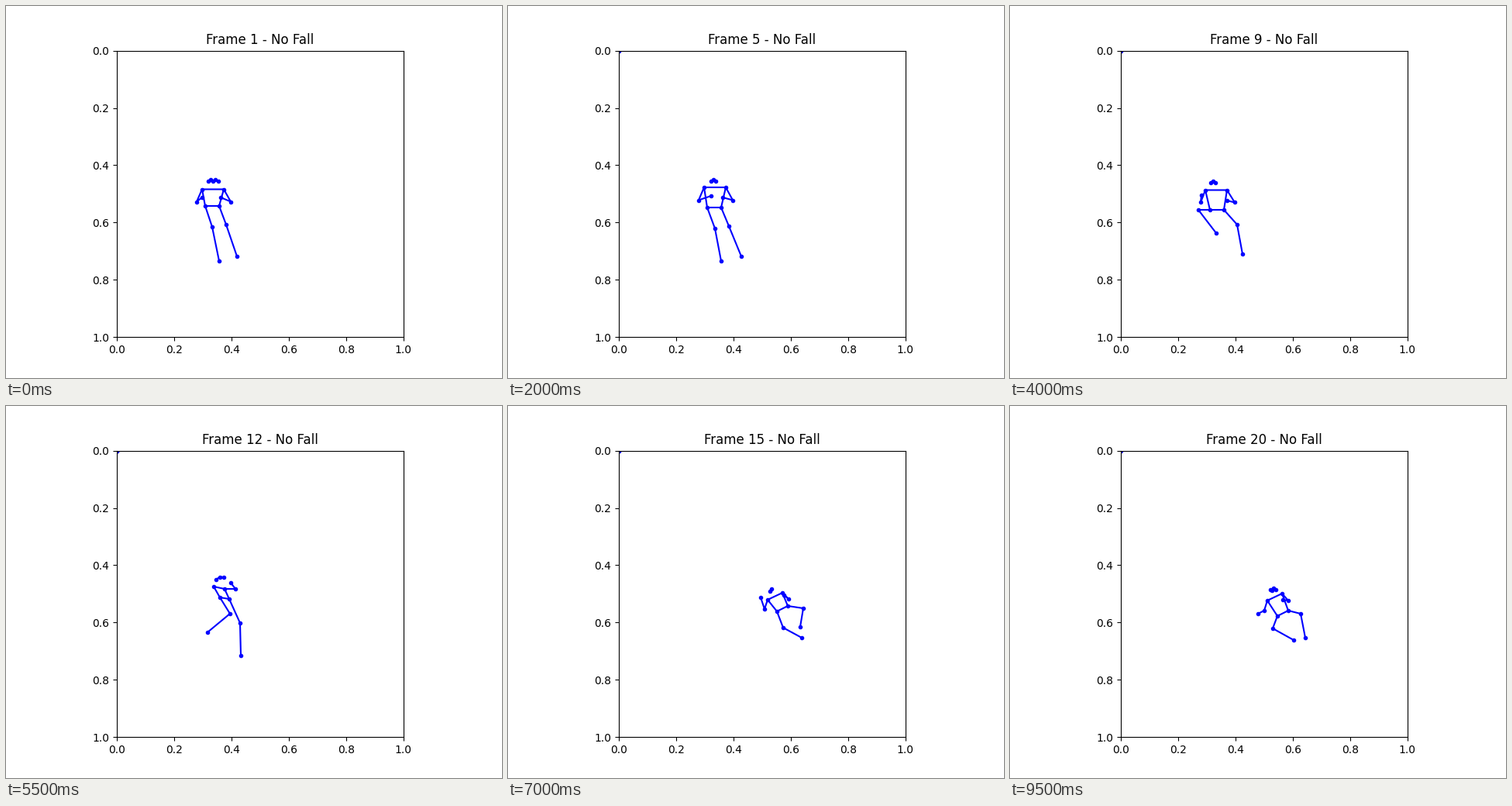
Animation of 640x480 px, one loop 10 s. Source, as a matplotlib script:

```python
import numpy as np
import matplotlib.pyplot as plt
from matplotlib.animation import FuncAnimation

FRAMES, INTERVAL = 20, 500
AXES_ORIGIN, AXES_SIZE = np.array([143.2, 57.6]), 369.6

# Three chains of joints, each running from the right side to the left.
FACE = ["r_ear", "r_eye", "nose", "l_eye", "l_ear"]
ARMS = ["r_wrist", "r_elbow", "r_shoulder", "l_shoulder", "l_elbow", "l_wrist"]
LEGS = ["r_ankle", "r_knee", "r_hip", "l_hip", "l_knee", "l_ankle"]
JOINTS = FACE + ARMS + LEGS
EDGES = [edge for chain in (FACE, ARMS, LEGS) for edge in zip(chain, chain[1:])]
EDGES += [("r_shoulder", "r_hip"), ("l_shoulder", "l_hip")]


def face(nose, step):
    """Five points spaced evenly along a line, with the eyes raised."""
    return {name: np.add(nose, np.multiply(step, k)) - (0, 2 * (abs(k) == 1))
            for k, name in enumerate(FACE, start=-2)}


def pose(nose, step, arms, legs):
    limbs = dict(zip(ARMS + LEGS, np.array(arms + legs, float)))
    return face(nose, step) | limbs


def standing():
    """Both sides mirror each other; the legs trail off to the lower right."""
    joints = face((267, 226), (3.25, 0))
    for side, s in (("r", -1), ("l", 1)):
        hip = np.array([266 + 9 * s, 258])
        joints |= {
            f"{side}_shoulder": np.array([267 + 14 * s, 236.5]),
            f"{side}_elbow": np.array([268 + 22 * s, 252.5]),
            f"{side}_wrist": np.array([265 + 12 * s, 247]),
            f"{side}_hip": hip,
            f"{side}_knee": hip + (9, 25.5 - 1.5 * s),
            f"{side}_ankle": hip + (20.5 + 2.5 * s, 68 - 3 * s),
        }
    return joints


STAND = standing()
BEND = pose(
    (281, 221), (5, -1.5),
    [(258, 240), (266, 246), (268, 233), (282, 236), (296, 236), (290, 228)],
    [(260, 292), (289, 268), (276, 247), (288, 249), (302, 280), (303, 322)])
SIT = pose(
    (335, 238), (2.4, -0.7),
    [(320, 261), (326, 262), (329, 250), (348, 241), (357, 249), (342, 250)],
    [(366, 302), (339, 287), (345, 269), (359, 262), (375, 268), (380, 286)])


def progress(frame, start, end):
    return np.clip((frame - start) / (end - start), 0, 1)


def move(joints, amount, **shifts):
    """Shift joints; a name without a side moves the whole group."""
    moved = dict(joints)
    for part, shift in shifts.items():
        group = FACE if part == "face" else [n for n in JOINTS if part in n]
        for name in group:
            moved[name] = moved[name] + amount * np.array(shift)
    return moved


def blend(a, b, u):
    return {name: (1 - u) * a[name] + u * b[name] for name in JOINTS}


def walk(frame):
    joints = move(STAND, progress(frame, 1, 5),
                  face=(1, 0), shoulder=(0, -2.5), hip=(0, 2), elbow=(0, -2),
                  r_wrist=(9, -2), knee=(1, 2), l_ankle=(3, 0))
    # The right foot stays planted, then lifts quickly.
    return move(joints, progress(frame, 5, 9) ** 4,
                face=(-3, 2), shoulder=(-1, 3.5), hip=(1, 3), elbow=(0, 3),
                r_wrist=(-15, -1), l_wrist=(3, 4), r_knee=(-24, -24),
                r_ankle=(-9, -36), l_knee=(8, -2), l_ankle=(-1, -3))


def sit(frame):
    joints = move(SIT, 1 - progress(frame, 15, 17),
                  face=(3, 1), shoulder=(6, 0), elbow=(5, 0), hip=(2, -4),
                  r_wrist=(6, -14), l_wrist=(14, -6), r_knee=(16, -1),
                  r_ankle=(13, -3), l_knee=(6, -7), l_ankle=(-3, -1))
    return move(joints, progress(frame, 17, 20),
                face=(3, 0), shoulder=(3, 1), elbow=(2, 2), hip=(0, 2),
                r_wrist=(0, 7), l_wrist=(10, 0), l_ankle=(1, 13))


def joints_at(frame):
    joints = blend(walk(frame), BEND, progress(frame, 9, 12))
    u = progress(frame, 12, 15)
    return blend(joints, sit(frame), u * u * (3 - 2 * u))


def hidden_joints(frame):
    """Undetected joints, which fall back to the axes origin."""
    if frame == 12:
        return {"l_eye", "l_ear", "r_wrist", "r_elbow"}
    if 5 <= frame < 12:
        return {"l_eye", "l_ear"} if frame % 2 else {"l_ear"}
    if frame == 15:
        return {"r_ear", "r_eye", "l_ear"}
    return {"r_ear"} if frame in (16, 19, 20) else set()


fig, ax = plt.subplots(figsize=(6.4, 4.8), dpi=100)
ax.set(xlim=(0, 1), ylim=(1, 0), aspect="equal")
bones, = ax.plot([], [], color="blue", lw=1.5)
dots, = ax.plot([], [], "o", color="blue", ms=3)
title = ax.set_title("")


def update(index):
    frame = index + 1
    hidden = hidden_joints(frame)
    points = {name: (xy - AXES_ORIGIN) / AXES_SIZE * (name not in hidden)
              for name, xy in joints_at(frame).items()}
    path = [point for a, b in EDGES if not hidden & {a, b}
            for point in (points[a], points[b], (np.nan, np.nan))]
    bones.set_data(*np.array(path).T)
    dots.set_data(*np.array(list(points.values())).T)
    title.set_text(f"Frame {frame} - No Fall")
    return bones, dots, title


anim = FuncAnimation(fig, update, frames=FRAMES, interval=INTERVAL,
                     repeat=True, repeat_delay=0, blit=False)
plt.show()
```
